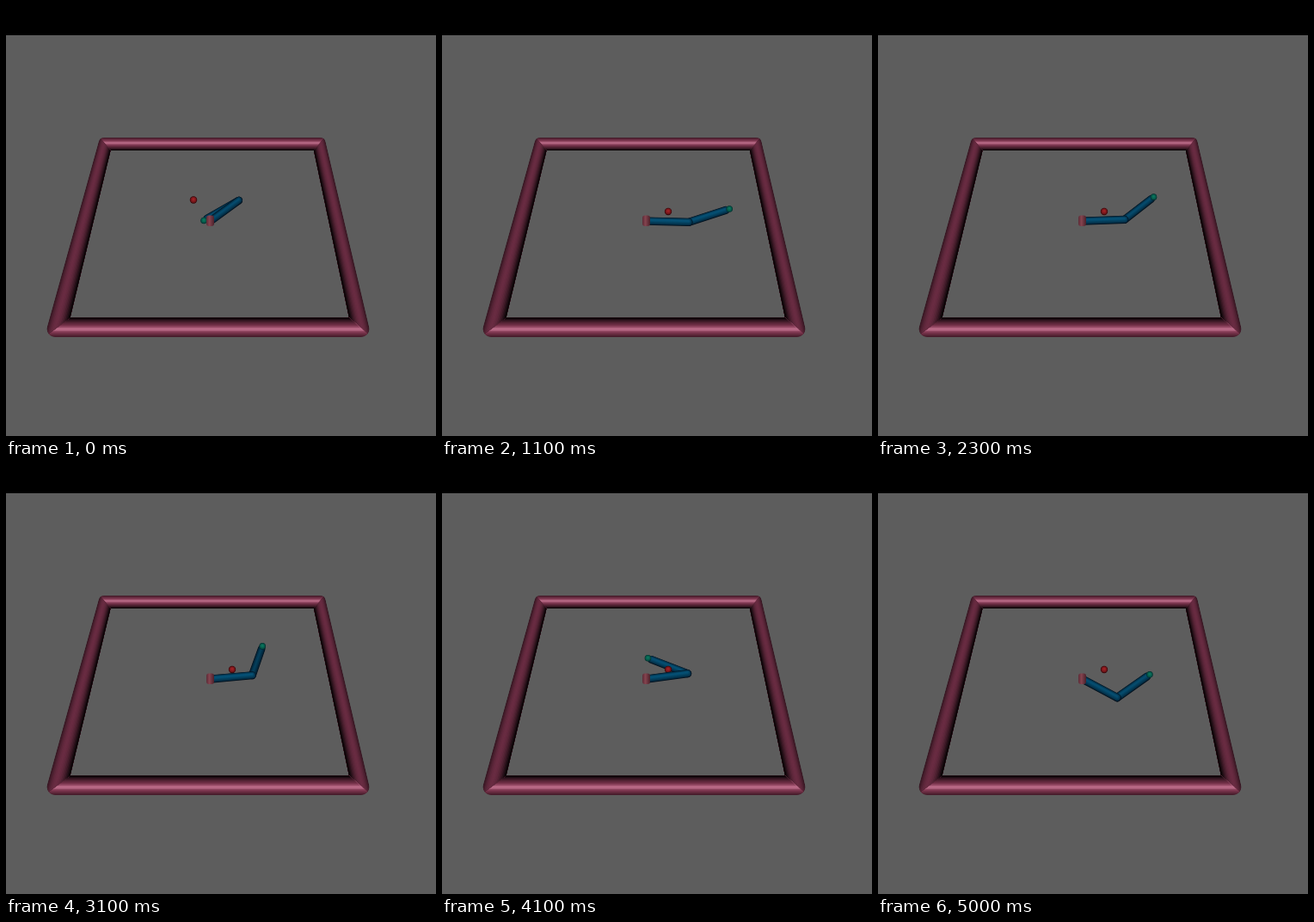
Recreate the animation shown at these times as an HTML page with a canvas. Size 500 px wide and 500 px high, loop 5100 ms.

```html
<!DOCTYPE html>
<html>
<head>
<meta charset="utf-8">
<title>Two-joint arm</title>
<style>
html, body { margin: 0; overflow: hidden; background: #5d5d5d; }
canvas { display: block; }
</style>
</head>
<body>
<canvas id="stage" width="500" height="500"></canvas>
<script>
const ctx = document.getElementById('stage').getContext('2d');
const LOOP = 5100, STEP = 100, BOUNCE = 4.2;

const rgb = c => `rgb(${c.map(Math.round)})`;
const mix = (a, b, k) => a.map((v, i) => v + (b[i] - v) * k);
const point = (x, y) => ({ x, y });
const between = (a, b, k) => point(a.x + (b.x - a.x) * k, a.y + (b.y - a.y) * k);

// Joint angles in degrees: the forearm speeds up, hits its stop and swings back
function pose(ms) {
  if (ms < STEP) return [46.5, 220];
  const s = (ms - STEP) / 1000;
  if (s > BOUNCE) {
    const drop = 1 - Math.exp((BOUNCE - s) / 0.45);
    return [11 - 60.8 * drop, 175 - 167 * drop];
  }
  const u = s / BOUNCE, ease = u * u * (3 - 2 * u);
  return [14 * ease ** 1.4 - 3, 9 + 15.3 * s + 80 * (s / 4) ** 5];
}

// Floor coordinates to screen, with perspective
function project({ x, y }) {
  const w = 1 / (0.003381 + 0.00201 * y);
  return {
    x: 239.5 - 0.0413 * (w - 251) + x * w / 0.6,
    y: 162.2 + 1.963 * (w - 251),
    r: w / 64
  };
}

function polar(from, deg, len) {
  const a = deg * Math.PI / 180;
  return point(from.x + len * Math.cos(a), from.y + len * Math.sin(a));
}

// Capsule shaded from rim to axis, with the highlight raised by lift
function capsule(a, b, dark, light, lift) {
  const angle = Math.atan2(b.y - a.y, b.x - a.x);
  for (let k = 0; k < 1; k += 0.125) {
    const end = (p, from) =>
      ctx.arc(p.x, p.y - lift * k * p.r, p.r * (1 - k), from, from + Math.PI);
    ctx.fillStyle = rgb(mix(dark, light, Math.sqrt(k)));
    ctx.beginPath();
    end(a, angle + Math.PI / 2);
    end(b, angle - Math.PI / 2);
    ctx.fill();
  }
}

const ball = (p, dark, light) => capsule(p, p, dark, light, 0.25);

function link(a, b) {
  const level = Math.abs(b.x - a.x) / Math.hypot(b.x - a.x, b.y - a.y);
  const k = 0.65 + 0.35 * level;
  capsule(a, b, [0, 14, 26], [6, 86 * k, 124 * k], 0.35);
}

// Mitred frame: each side is built of strips from its outer to its inner edge
const outer = [point(109, 153), point(370.5, 153), point(425, 385), point(44.5, 385)];
const inner = [point(121.5, 168), point(358, 168), point(399, 362.5), point(74.5, 362.5)];

function drawFrame() {
  ctx.save();
  ctx.beginPath();
  outer.forEach((p, i) => {
    const next = outer[(i + 1) % 4], mid = between(p, next, 0.5);
    if (!i) ctx.moveTo(mid.x, mid.y);
    const after = outer[(i + 2) % 4];
    ctx.arcTo(next.x, next.y, after.x, after.y, i === 0 || i === 3 ? 7 : 10);
  });
  ctx.closePath();
  ctx.clip();
  const strips = 16;
  for (let i = 0; i < 4; i++) {
    const j = (i + 1) % 4, level = i % 2 === 0;
    for (let n = 0; n < strips; n++) {
      const k = n / strips, light = Math.sin(Math.PI * (0.15 + 0.85 * (k + 0.5 / strips)));
      const shine = level ? 55 * light ** 24 : 0, gain = level ? 1 : 0.78;
      const corners = [between(outer[i], inner[i], k), between(outer[j], inner[j], k),
        inner[j], inner[i]];
      ctx.fillStyle = rgb([134, 56, 84].map(v => v * light * gain + shine));
      ctx.beginPath();
      corners.forEach(p => ctx.lineTo(p.x, p.y));
      ctx.fill();
    }
  }
  ctx.restore();
}

function drawPost() {
  const shade = ctx.createLinearGradient(233, 0, 242, 0);
  shade.addColorStop(0, '#5c2a36');
  shade.addColorStop(0.4, '#84444f');
  shade.addColorStop(1, '#4a202a');
  ctx.fillStyle = shade;
  ctx.beginPath();
  ctx.roundRect(233, 243.5, 9, 12.5, 3);
  ctx.fill();
}

function draw(ms) {
  const [upper, fore] = pose(ms);
  const base = point(0, 0), elbow = polar(base, upper, 0.1);
  const [b, e, w, f] = [base, elbow, polar(elbow, fore, 0.1), polar(elbow, fore, 0.11)].map(project);
  const goal = ms < STEP ? { x: 218, y: 225.5, r: 4.2 } : { x: 263, y: 239, r: 4.2 };

  ctx.fillStyle = '#5d5d5d';
  ctx.fillRect(0, 0, 500, 500);
  ctx.fillStyle = '#000';
  ctx.fillRect(0, 0, 500, 34);
  drawFrame();

  // Far parts first
  const parts = [
    [(b.y + e.y) / 2, () => link(b, e)],
    [(e.y + w.y) / 2, () => {
      link(e, w);
      ball({ ...f, r: 3.8 }, [2, 44, 44], [12, 128, 100]);
    }],
    [goal.y, () => ball(goal, [48, 6, 10], [176, 38, 42])]
  ];
  parts.sort((p, q) => p[0] - q[0]).forEach(part => part[1]());
  drawPost();
}

function tick() {
  const t = performance.now() % LOOP;
  draw(Math.floor(t / STEP) * STEP);
  requestAnimationFrame(tick);
}
tick();
</script>
</body>
</html>
```
